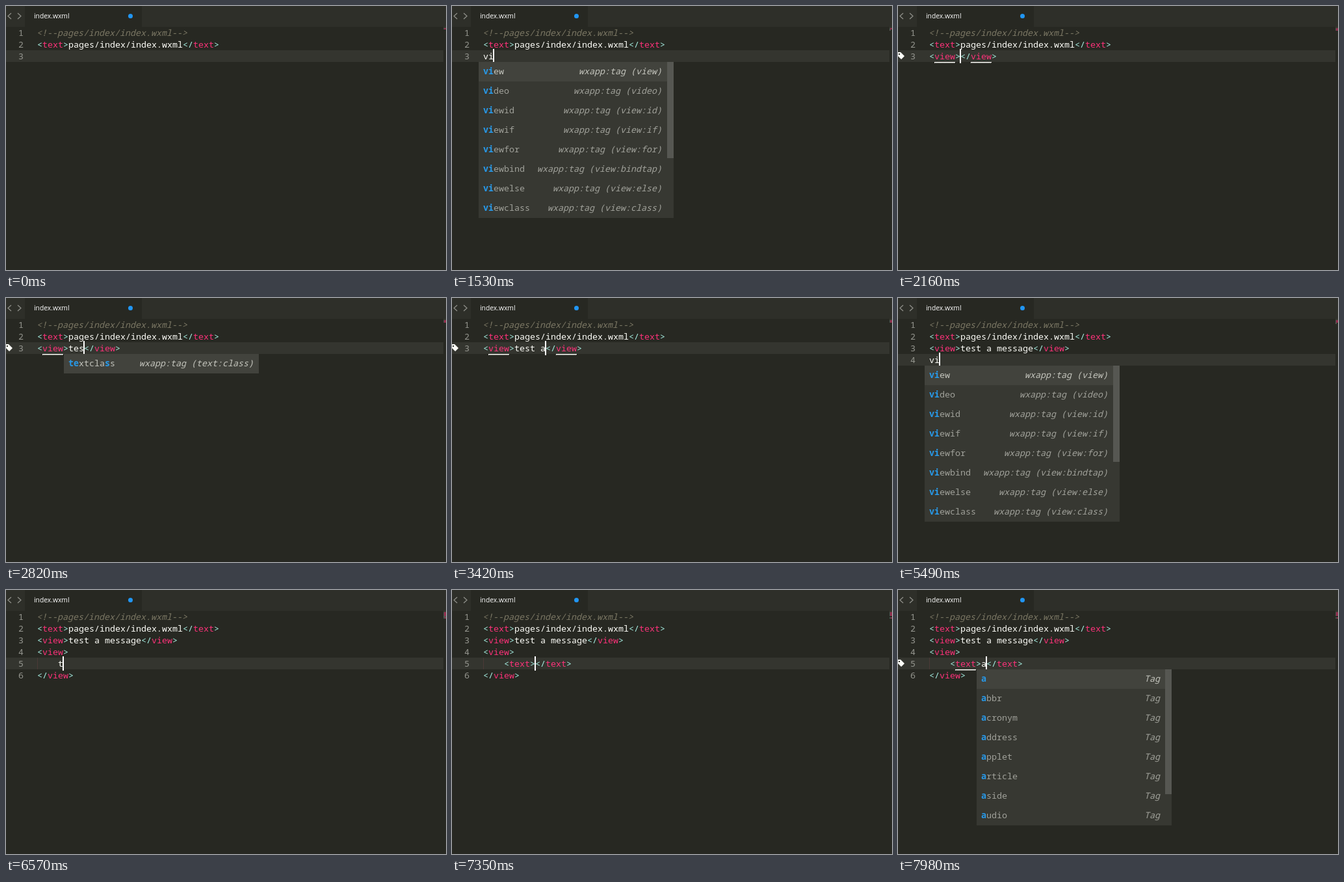
Recreate the animation shown at these times as an HTML page with a canvas. Size 677 by 406 pixels, loop 8000 ms.

```html
<!DOCTYPE html>
<html lang="en">
<head>
<meta charset="utf-8">
<style>
html, body { margin: 0; width: 100%; height: 100%; overflow: hidden; background: #272822; }
canvas { display: block; }
</style>
</head>
<body>
<canvas id="stage" width="677" height="406"></canvas>
<script>
const ctx = document.getElementById("stage").getContext("2d");
const LOOP = 8000, LEFT = 48, TOP = 32, CHAR = 8, LINE = 18, ROW = 30, POPUP_WIDTH = 300;
const MONO = '13.3333px "Noto Sans Mono", monospace';
const WHITE = "#fdfdf8", CYAN = "#a8f2e6", PINK = "#fb3279", COMMENT = "#7b7764";

const FIXED = ["<!--pages/index/index.wxml-->", "<text>pages/index/index.wxml</text>"];
const MESSAGE = "<view>test a message</view>";

// Completions: "name detail"; without a detail the hint is just "Tag".
const views = ["view view", "viewid view:id", "viewif view:if", "viewfor view:for", "viewbind view:bindtap",
  "viewelse view:else", "viewclass view:class", "viewstyle view:style"];
const viVideo = [views[0], "video video", ...views.slice(1, 7)];
const texts = ["text text", "textid text:id", "textarea textarea", "textclass text:class"];
const tTags = [...texts, "template template", "table", "tbody", "td"];
const teTags = [...texts, "template template", "time", "title", "tfoot"];
const aTags = ["a", "abbr", "acronym", "address", "applet", "article", "aside", "audio"];
const mTags = ["main", "map", "mark", "math", "menu", "meta"];

// key = matched letters; total = number of entries including those scrolled out of sight
const popup = (key, items, total = items.length) => ({ key, items, total });
const vi = popup("vi", viVideo, 13), vie = popup("vie", views, 12), view = popup("view", views, 12);
const te = popup("te", teTags, 10), a = popup("a", aTags, 10), m = popup("m", mTags);

// [time, text after the fixed lines with | as the cursor, popup]
const inView = s => `<view>${s}|</view>`;
const next = s => MESSAGE + "\n" + s;
const inner = s => next(`<view>\n    ${s}\n</view>`);
const steps = [
  [-500, "|"],
  [1470, "v|"], [1530, "vi|", vi], [1650, "vie|", vie], [1740, "view|", view],
  [1920, inView("")],
  [2580, inView("t"), popup("t", tTags, 10)], [2640, inView("te"), te],
  [2820, inView("tes"), popup("tes", ["textclass text:class"])],
  [2970, inView("test"), popup("tes", ["textclass text:class"])],
  [3000, inView("test"), popup("tets", ["textclass text:class"])],
  [3270, inView("test ")], [3420, inView("test a")], [3450, inView("test a"), a], [3540, inView("test a ")],
  [3690, inView("test a m")], [3720, inView("test a m"), m],
  [3780, inView("test a me"), popup("me", mTags.slice(4))],
  [3990, inView("test a mes")], [4140, inView("test a mess")], [4230, inView("test a messa")],
  [4320, inView("test a messag")], [4410, inView("test a message")],
  [4740, MESSAGE + "|"], [5010, next("|")],
  [5430, next("v|")], [5490, next("vi|"), vi], [5580, next("vie|"), vie], [5670, next("view|"), view],
  [5850, next(inView(""))], [6120, inner("|")],
  [6570, inner("t|")], [6630, inner("te|"), te],
  [6840, inner("tex|"), popup("tex", texts)], [6990, inner("text|"), popup("text", texts)],
  [7350, inner("<text>|</text>")], [7950, inner("<text>a|</text>")], [7980, inner("<text>a|</text>"), a]
];

function rect(x, y, w, h, color) {
  ctx.fillStyle = color;
  ctx.fillRect(x, y, w, h);
}

function write(text, x, y, color, style = "", font = MONO) {
  ctx.font = style + " " + font;
  ctx.fillStyle = color;
  // slanted glyphs lean right, so they start a little earlier
  ctx.fillText(text, style === "italic" ? x - 1 : x, y);
}

function tokens(line) {
  if (line.startsWith("<!--")) return [{ text: line, col: 0, color: COMMENT, style: "italic" }];
  return [...line.matchAll(/<\/?|>|(?<=<\/?)\w+|[^<>]+/g)].map(({ 0: text, index: col }) => {
    const tag = line[col - 1] === "<" || line.slice(col - 2, col) === "</";
    return { text, col, tag, style: "", color: /[<>]/.test(text) ? CYAN : tag ? PINK : WHITE };
  });
}

function drawHeader() {
  rect(0, 0, 677, TOP, "#2e2f29");
  rect(29, 0, 180, TOP, "#272822");
  ctx.strokeStyle = "#92928c";
  ctx.lineWidth = 1.2;
  ctx.stroke(new Path2D("M8 11 L3 15.5 L8 20 M18 11 L23 15.5 L18 20"));
  write("index.wxml", 43, 19, "#fff", "", '10.3px "Open Sans", sans-serif');
  ctx.fillStyle = "#2196f3";
  ctx.beginPath();
  ctx.arc(191.5, 15.5, 3.5, 0, 7);
  ctx.fill();
}

function drawLine(line, i) {
  const y = TOP + LINE * i;
  write(i + 1, 19, y + 14, "#95968f");
  for (const { text, col, color, style } of tokens(line)) {
    write(text, LEFT + col * CHAR, y + 14, color, style);
    // sliver of the minimap at the right edge
    ctx.globalAlpha = color === PINK ? 0.5 : 0.2;
    if (col < 4 && text.trim()) rect(673 + col, TOP + 2 * i, Math.min(text.length, 4 - col), 2, color);
    ctx.globalAlpha = 1;
  }
}

function drawTagMarks(line, i) {
  const y = TOP + LINE * i;
  ctx.fillStyle = WHITE;
  ctx.fill(new Path2D(`M0 ${y + 3} h4 l6 6 l-5 5 l-5 -5 z M1 ${y + 5} v2 h2 v-2 z`), "evenodd");
  for (const { text, col, tag } of tokens(line)) {
    if (!tag) continue;
    const x = LEFT + col * CHAR, w = text.length * CHAR;
    rect(x, y + 18, w, 1, WHITE);
    for (let d = 0; d < w; d += 2) rect(x + d, y + 19, 1, 1, WHITE);
  }
}

function drawPopup({ key, items, total }, col, i) {
  const x = LEFT + col * CHAR - 7, y = TOP + LINE * (i + 1), height = items.length * ROW;
  const scrolls = total > items.length, bar = scrolls ? 10 : 0;
  rect(x, y, POPUP_WIDTH, height, "#373832");
  rect(x, y, POPUP_WIDTH - bar, ROW, "#42433d");
  if (scrolls) rect(x + POPUP_WIDTH - bar, y, bar, Math.round(height * items.length / total), "#565752");
  items.forEach((item, n) => {
    const [name, detail] = item.split(" ");
    const hint = detail ? `wxapp:tag (${detail})` : "Tag";
    const base = y + n * ROW + 19, color = n ? "#a0a19a" : "#c4c5bd";
    let matched = 0;
    [...name].forEach((c, k) => {
      const hit = c === key[matched];
      if (hit) matched++;
      write(c, x + 7 + k * CHAR, base, hit ? "#2899e8" : color, hit ? "bold" : "");
    });
    write(hint, x + POPUP_WIDTH - 7 - bar - hint.length * CHAR, base, color, "italic");
  });
}

// Full, two fading levels, then dark until the next period
function cursorAlpha(phase) {
  phase %= 980;
  return phase < 375 ? 1 : phase < 435 ? 0.66 : phase < 495 ? 0.33 : 0;
}

function draw(t) {
  const [, marked, list] = steps.findLast(s => s[0] <= t);
  const typedAt = steps.find(s => s[1] === marked)[0];
  const before = [...FIXED, marked.split("|")[0]].join("\n").split("\n");
  const lines = [...FIXED, ...marked.replace("|", "").split("\n")];
  const row = before.length - 1, typed = before[row];
  const y = TOP + LINE * row;

  rect(0, 0, 677, 406, "#272822");
  drawHeader();
  rect(0, y, 673, LINE, "#34352f");
  if (t >= 6570) rect(LEFT, TOP + LINE * 4, 1, LINE, "#4b3a36");
  lines.forEach(drawLine);
  if (t >= 2160 && t < 5280) drawTagMarks(lines[2], 2);
  if (t >= 7530) drawTagMarks(lines[4], 4);

  ctx.globalAlpha = cursorAlpha(t - typedAt);
  rect(LEFT + typed.length * CHAR - 1, y - 2, 2, 22, "#fff");
  ctx.globalAlpha = 1;
  if (list) drawPopup(list, typed.search(/\w*$/), row);
}

const start = performance.now();
function tick() {
  draw((performance.now() - start) % LOOP);
  requestAnimationFrame(tick);
}
tick();
</script>
</body>
</html>
```
